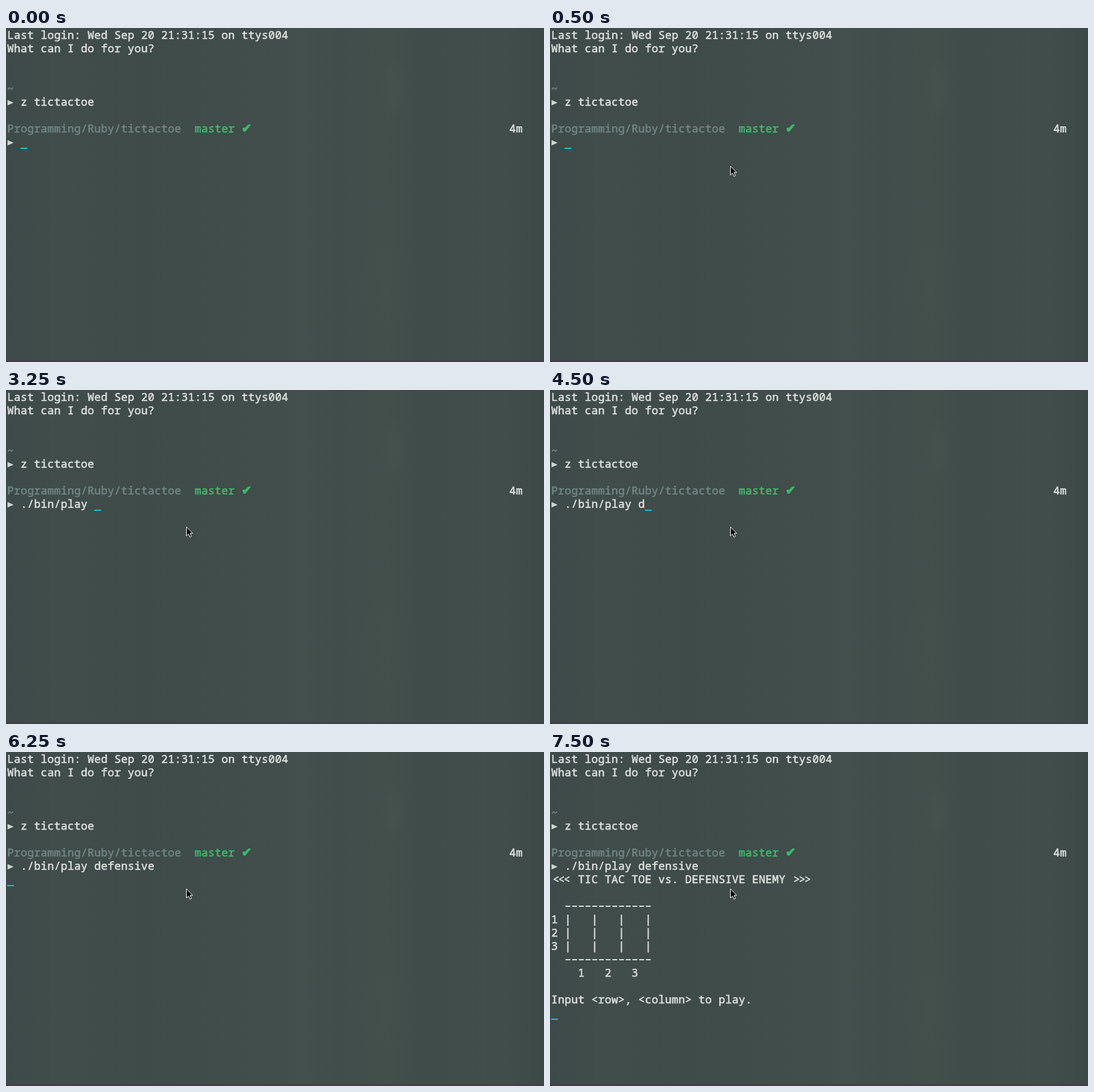
Write an HTML page that moves like this. It is 884 px wide and 550 px high and loops after 8000 ms.

```html
<!DOCTYPE html>
<html lang="en">
<head>
<meta charset="utf-8">
<title>Terminal session</title>
<style>
  html, body { margin: 0; width: 100%; height: 100%; overflow: hidden; background: #3f4c49; }
  svg { display: block; width: 884px; height: 550px; }
  text {
    font: 500 18px "Noto Sans Mono", "DejaVu Sans Mono", monospace;
    letter-spacing: .2px; /* 11px terminal cell */
    font-variant-ligatures: none;
    white-space: pre;
    fill: #dcdfdd;
    stroke: #dcdfdd;
    stroke-width: .6px; /* medium weight */
    stroke-linejoin: round;
  }
  .path { fill: #6f8583; stroke: #6f8583; }
  .branch { fill: #3cba6b; stroke: #3cba6b; }
  .check { font: 20px "DejaVu Sans", sans-serif; stroke-width: 1.2px; }
  .prompt { fill: #cfd4d2; }
</style>
</head>
<body>
<svg viewBox="0 0 884 550">
  <defs>
    <linearGradient id="streaks">
      <stop offset="0" stop-color="#3e4a49"/>
      <stop offset=".1" stop-color="#404d4b"/>
      <stop offset=".26" stop-color="#3f4b49"/>
      <stop offset=".42" stop-color="#404d4a"/>
      <stop offset=".515" stop-color="#414e4b"/>
      <stop offset=".545" stop-color="#43504c"/>
      <stop offset=".62" stop-color="#404d4a"/>
      <stop offset=".71" stop-color="#424f4b"/>
      <stop offset=".77" stop-color="#404c49"/>
      <stop offset=".93" stop-color="#404d4a"/>
      <stop offset="1" stop-color="#3d4948"/>
    </linearGradient>
    <radialGradient id="glow">
      <stop offset="0" stop-color="#4b5954" stop-opacity=".35"/>
      <stop offset="1" stop-color="#4b5954" stop-opacity="0"/>
    </radialGradient>
  </defs>
  <rect width="884" height="550" fill="url(#streaks)"/>
  <ellipse cx="638" cy="100" rx="28" ry="60" fill="url(#glow)"/>
  <ellipse cx="620" cy="425" rx="50" ry="110" fill="url(#glow)" opacity=".4"/>
  <rect y="547" width="884" height="3" fill="#453f4b"/>
  <g id="screen"></g>
  <g id="game"></g>
  <rect id="cursor" width="11" height="2" fill="#12c4dc"/>
  <path id="pointer" d="M.5 .5V15.2L3.9 12 6.2 17.3 8.7 16.2 6.4 11H10.7Z"
        fill="#000" stroke="#fff" stroke-linejoin="round"/>
</svg>
<script>
const CELL = 11, ROW = 22, LOOP = 8000;
const COMMAND = "./bin/play defensive";
const $ = id => document.getElementById(id);
const colX = col => 2 + col * CELL;
const baseline = row => 18 + row * ROW;

function add(parent, tag, attrs, content = "") {
  const node = document.createElementNS("http://www.w3.org/2000/svg", tag);
  for (const key in attrs) node.setAttribute(key, attrs[key]);
  node.textContent = content;
  parent.append(node);
  return node;
}

const write = (parent, row, col, content, style = "") =>
  add(parent, "text", { x: colX(col), y: baseline(row), class: style }, content);

function prompt(row) {
  const y = baseline(row);
  add(screen, "path", { d: `M2.5 ${y - 9.5}L12.5 ${y - 5} 2.5 ${y - .5}Z`, class: "prompt" });
}

// Three chevrons drawn closer together than the cell grid
function chevrons(row, x, char) {
  for (let i = 0; i < 3; i++)
    add(game, "text", { x: x + i * 9, y: baseline(row) }, char);
}

function rule(row) {
  const y = baseline(row) - 6;
  add(game, "path", { d: `M25.5 ${y}H167`, stroke: "#dcdfdd", "stroke-width": 1.8, "stroke-dasharray": "8 3" });
}

const screen = $("screen"), game = $("game");

write(screen, 0, 0, "Last login: Wed Sep 20 21:31:15 on ttys004");
write(screen, 1, 0, "What can I do for you?");
write(screen, 4, 0, "~", "path");
prompt(5);
write(screen, 5, 2, "z tictactoe");
write(screen, 7, 0, "Programming/Ruby/tictactoe", "path");
write(screen, 7, 28, "master", "branch");
write(screen, 7, 35, "✔", "branch check");
write(screen, 7, 75, "4m");
prompt(8);
const typed = write(screen, 8, 2, "");

chevrons(9, 4.5, "<");
write(game, 9, 4, "TIC TAC TOE vs. DEFENSIVE ENEMY");
chevrons(9, 400, ">");
rule(11);
for (let i = 1; i <= 3; i++) write(game, 11 + i, 0, i + " |   |   |   |");
rule(15);
write(game, 16, 4, "1   2   3");
write(game, 18, 0, "Input <row>, <column> to play.");

// [time, characters typed]
const typing = [
  [0, 0], [1250, 1], [1750, 2], [2250, 5], [2500, 6], [2750, 7], [3000, 10], [3250, 11],
  [4500, 12], [4750, 15], [5000, 17], [5250, 18], [5500, 19], [5750, 20]
];
const ENTER = 6250, START = 6500;

function render(t) {
  const count = typing.findLast(([time]) => time <= t)[1];
  typed.textContent = COMMAND.slice(0, count);

  const row = t < ENTER ? 8 : t < START ? 9 : 19;
  $("cursor").setAttribute("x", colX(t < ENTER ? 2 + count : 0));
  $("cursor").setAttribute("y", 21 + row * ROW);

  game.style.display = t < START ? "none" : "";
  $("pointer").style.display = t < 500 ? "none" : "";
  $("pointer").setAttribute("transform", `translate(296 ${t < 750 ? 227 : 225})`);
}

const start = performance.now();
function tick() {
  render((performance.now() - start) % LOOP);
  requestAnimationFrame(tick);
}
tick();
</script>
</body>
</html>
```
